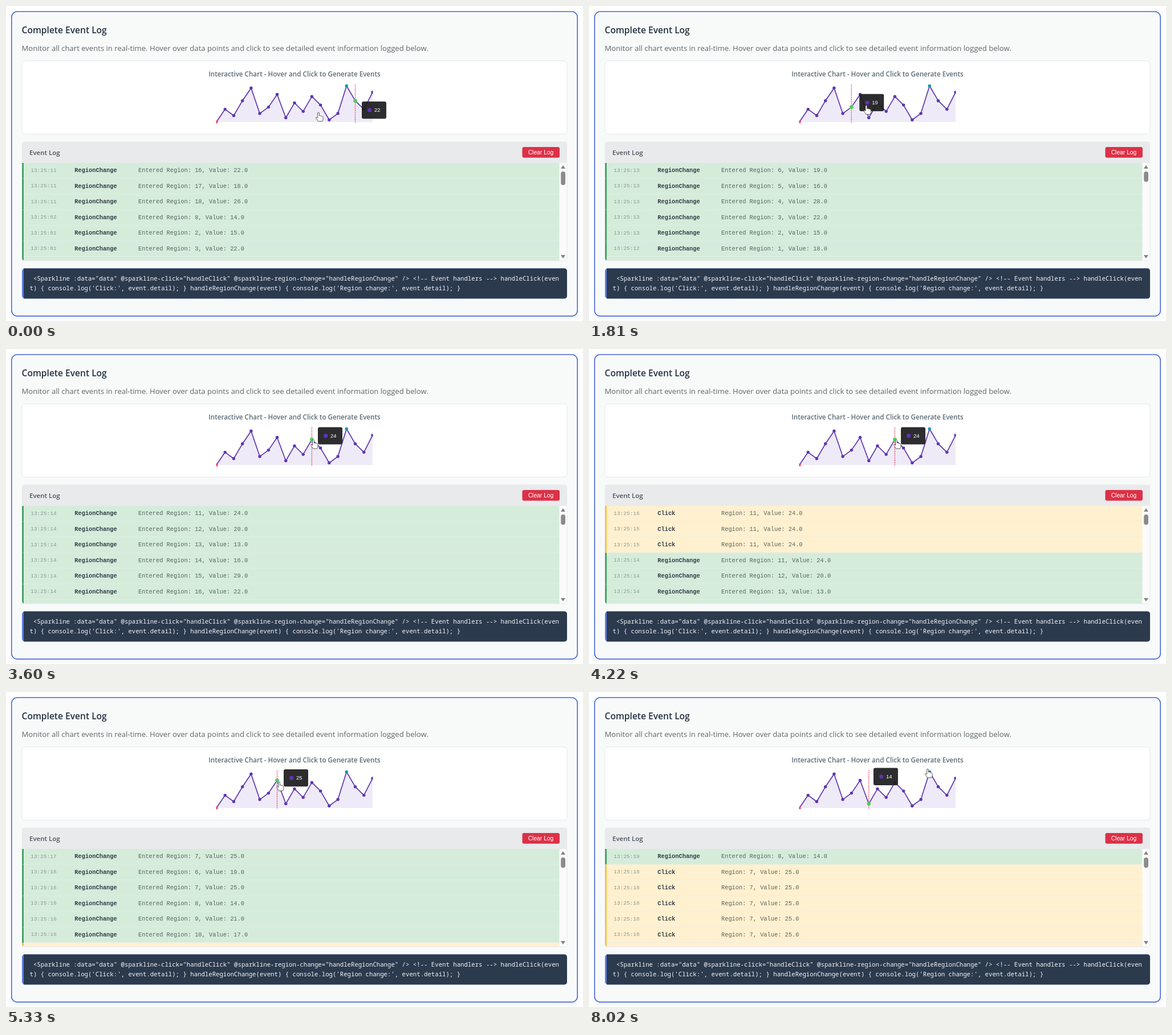
Recreate the animation shown at these times as an HTML page. Size 1012 by 554 pixels, loop 8.14 s.

```html
<!DOCTYPE html>
<html lang="en">
<head>
<meta charset="utf-8">
<title>Complete Event Log</title>
<style>
  html, body { margin: 0; width: 100%; height: 100%; overflow: hidden; background: #fff; }
  svg { display: block; width: 1012px; height: 554px; }
  text { white-space: pre; }
  .ui { font-family: "Open Sans", "Noto Sans", sans-serif; }
  .semi { font-weight: 600; }
  .arial { font-family: "Liberation Sans", Arial, sans-serif; fill: #fff; }
  .code { font: 500 10.68px "Noto Sans Mono", monospace; fill: #f4f6f8; }
  .row { font: 10.33px "Liberation Mono", "Courier New", monospace; fill: #59645f; }
  .row .time { font-size: 9.43px; fill: #8b9a92; }
  .row .type { font-weight: 700; fill: #333e48; }
</style>
</head>
<body>
<svg viewBox="0 0 1012 554">
  <defs>
    <clipPath id="plot"><rect x="368.5" y="136" width="275" height="70.5"/></clipPath>
    <clipPath id="list"><path d="M28 276H984V447.5H32Q28 447.5 28 443Z"/></clipPath>
    <filter id="glow" x="-5%" y="-5%" width="110%" height="110%"><feGaussianBlur stdDeviation="4"/></filter>
  </defs>

  <rect x="9" y="11" width="994" height="538" rx="12" fill="#4a6cf0" opacity=".1" filter="url(#glow)"/>
  <rect x="9.8" y="9.8" width="992.4" height="535.6" rx="10" fill="#f8fafa" stroke="#4a69d2" stroke-width="1.6"/>
  <text class="ui semi" x="27.5" y="47.5" font-size="15.6" fill="#22303f">Complete Event Log</text>
  <text class="ui" x="27.5" y="78.5" font-size="13.11" fill="#626668">Monitor all chart events in real-time. Hover over data points and click to see detailed event information logged below.</text>

  <rect x="28" y="96.5" width="956" height="128.8" rx="6" fill="#fff" stroke="#e4e7ea"/>
  <text class="ui semi" x="506" y="124.3" font-size="11.65" fill="#5d6b75" text-anchor="middle">Interactive Chart - Hover and Click to Generate Events</text>
  <g id="chart" clip-path="url(#plot)"></g>

  <path d="M28 448V243Q28 238.5 33 238.5H979Q984 238.5 984 243V448" fill="#e9eaec"/>
  <text class="ui semi" x="41" y="262" font-size="11.5" fill="#49525a">Event Log</text>
  <rect x="905.5" y="248" width="65.5" height="18.7" rx="3" fill="#dc3147"/>
  <text class="arial" x="938" y="261" font-size="10.3" text-anchor="middle">Clear Log</text>
  <g id="rows" clip-path="url(#list)"></g>
  <rect x="970.5" y="276" width="13.5" height="172" fill="#fbfbfb"/>
  <path d="M973 286L977 280L981 286ZM973 438L977 444L981 438Z" fill="#828282"/>
  <rect id="thumb" x="973.2" y="291" width="7.8" rx="3.9" fill="#8b8b8b"/>
  <path d="M28 276V443.5Q28 448 32.5 448H979.5Q984 448 984 443.5V276" fill="none" stroke="#e1e4e6" stroke-width=".8"/>

  <rect x="28" y="461.5" width="956" height="53" rx="5" fill="#5c7de6"/>
  <path d="M31 461.5H979Q984 461.5 984 466.5V509.5Q984 514.5 979 514.5H31Z" fill="#2c3a4e"/>
  <text class="code" x="41.5" y="483.3"> &lt;Sparkline :data="data" @sparkline-click="handleClick" @sparkline-region-change="handleRegionChange" /&gt; &lt;!-- Event handlers --&gt; handleClick(even</text>
  <text class="code" x="41.5" y="499.6">t) { console.log('Click:', event.detail); } handleRegionChange(event) { console.log('Region change:', event.detail); }</text>

  <g id="tip"></g>
  <path id="hand" d="M-1.4 .9Q0-.8 1.3 .9V6Q2.8 5 3.8 6.4Q5.3 5.6 6.1 7.1Q7.9 6.8 8 8.5V11.8Q7.8 14 6.6 15.8H-.6Q-1.8 13.2-4.2 10.2Q-4.6 8.2-2.8 8.6L-1.4 10Z" fill="#fff" stroke="#4a4a4a" stroke-width=".9" stroke-linejoin="round"/>
</svg>
<script>
const LOOP = 8140, LEAD = 120, PURPLE = '#5e35b1', RED = '#ef4a60', TEAL = '#0c98a0';
const data = [12, 18, 15, 22, 28, 16, 19, 25, 14, 21, 17, 24, 20, 13, 16, 29, 22, 18, 26];
const min = 0, max = 15, step = 15.22;
const px = i => 369 + i * step;
const py = i => 204 - (data[i] - 12) * 3.735;
const $ = id => document.getElementById(id);

// Mouse stops as time, x, y; it eases between them
const stops = [
  [0, 616, 190], [120, 548, 187], [760, 372, 186.5], [840, 372, 186.5], [2950, 610, 162],
  [3050, 539, 159.5], [4530, 539, 159.5], [4900, 458, 161], [5330, 479, 158],
  [7990, 479, 158], [LOOP, 594, 135]
];
function mouse(t) {
  const i = stops.findLastIndex(s => s[0] <= t), a = stops[i], b = stops[i + 1] || a;
  const f = b === a ? 0 : (t - a[0]) / (b[0] - a[0]), e = f * f * (3 - 2 * f);
  return { x: a[1] + (b[1] - a[1]) * e, y: a[2] + (b[2] - a[2]) * e };
}

// The picture changes in steps: while the mouse moves, and at each click
const spread = (from, to, n) => Array.from({ length: n }, (_, i) => from + (to - from) * i / (n - 1));
const clicks = [3850, 4010, 4220, 4430, 5870, 6100, 6320, 6480, 6700, 6930];
const times = [0, ...spread(120, 3050, 28), ...clicks, ...spread(4630, 5330, 8), LOOP - LEAD]
  .sort((a, b) => a - b);

const entry = (region, sec, click = false) => ({ region, sec, click });
let log = [[16, 11], [17, 11], [18, 11], [8, 2], [2, 1], [3, 1], [4, 1]].map(e => entry(...e));
let region = 16, count = 38;

// The chart follows the mouse a moment behind the pointer
const states = times.map(t => {
  const hover = mouse(t), goal = Math.round((hover.x - 369) / step);
  const add = click => {
    log = [entry(region, Math.floor((11900 + t) / 1000), click), ...log].slice(0, 7);
    count++;
  };
  while (region !== goal) { region += Math.sign(goal - region); add(false); }
  if (clicks.includes(t)) add(true);
  return { hover, pointer: mouse(t + LEAD), region, log, count: Math.min(50, count) };
});

const dot = (x, y, r, fill) => `<circle cx="${x}" cy="${y}" r="${r}" fill="${fill}"/>`;
const colour = i => i === min ? RED : i === max ? TEAL : PURPLE;
const line = data.map((_, i) => `${px(i)} ${py(i)}`).join('L');
const graph = `<path d="M369 204L${line}V204Z" fill="${PURPLE}" opacity=".1"/>
  <path d="M${line}" fill="none" stroke="${PURPLE}" stroke-width="1.7" stroke-linejoin="round"/>`
  + data.map((_, i) => dot(px(i), py(i), 2.7, colour(i))).join('');

function row({ region, sec, click }, i) {
  const y = 276 + i * 27.5, base = y + 16.4;
  const detail = `${click ? '' : 'Entered '}Region: ${region}, Value: ${data[region].toFixed(1)}`;
  return `<rect x="28" y="${y}" width="943" height="27.5" fill="${click ? '#fff0cf' : '#d5ecdb'}"/>
    <rect x="28" y="${y + 26.7}" width="943" height=".8" fill="#e6efe9"/>
    <rect x="28" y="${y}" width="2.8" height="27.5" fill="${click ? '#f8bd2c' : '#25994a'}"/>
    <g class="row"><text class="time" x="43.3" y="${base - .8}">13:25:${String(sec).padStart(2, '0')}</text>
    <text class="type" x="120.3" y="${base}">${click ? 'Click' : 'RegionChange'}</text>
    <text x="232" y="${base}">${detail}</text></g>`;
}

function tooltip({ hover, region }) {
  const x = hover.x + 8, y = hover.y - 22;
  const label = region === min ? 'Min: ' : region === max ? 'Max: ' : '';
  return `<rect x="${x}" y="${y}" width="${label ? 63.3 : 43}" height="30.3" rx="3" fill="#1c1c1e" opacity=".92"/>
    ${dot(x + 13.7, y + 15.2, 3.6, colour(region))}
    <text class="arial" x="${x + 22}" y="${y + 18.4}" font-size="9.6">${label}${data[region]}</text>`;
}

function draw(s) {
  const x = px(s.region);
  $('chart').innerHTML = graph
    + `<path d="M${x} 138V206" stroke="#e4304c" stroke-width="1.4" stroke-dasharray="1.6 1.6"/>`
    + dot(x, py(s.region), 3.3, '#4fcf5c');
  $('rows').innerHTML = s.log.map(row).join('');
  $('thumb').setAttribute('height', 912 / s.count);
  $('tip').innerHTML = tooltip(s);
  $('hand').setAttribute('transform', `translate(${s.pointer.x} ${s.pointer.y})`);
}

let shown = -1;
function tick() {
  const t = performance.now() % LOOP;
  const i = times.findLastIndex(v => v <= t);
  if (i !== shown) draw(states[shown = i]);
  requestAnimationFrame(tick);
}
tick();
</script>
</body>
</html>
```
